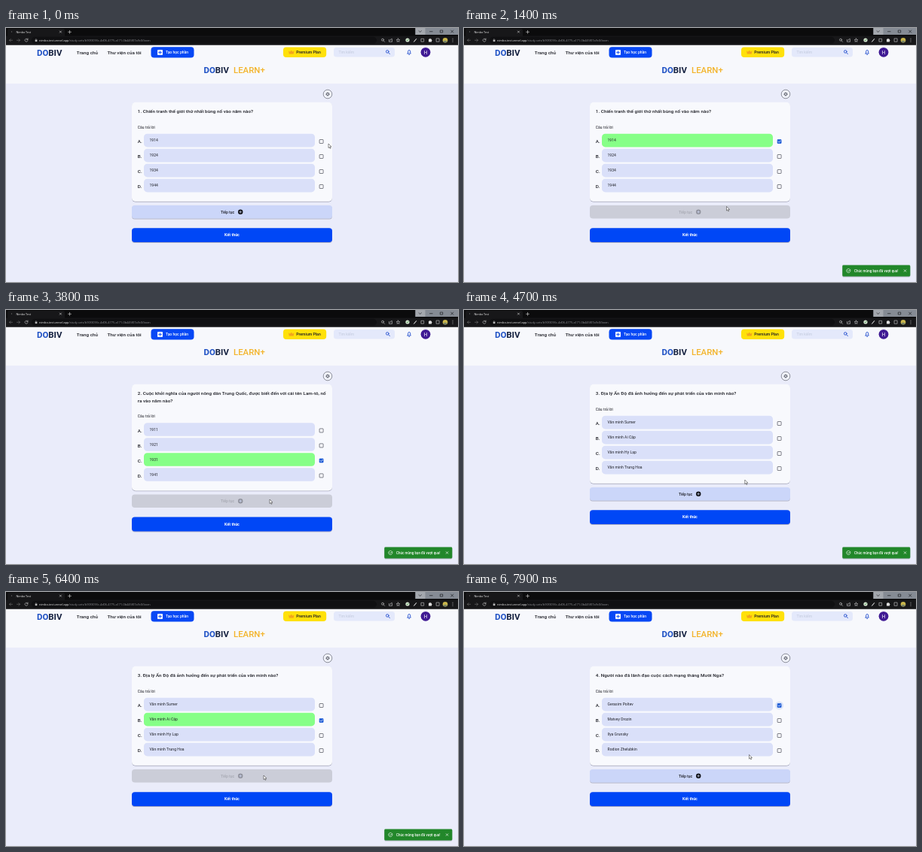
Recreate the animation shown at these times as an HTML page. Size 600x338 px, loop 8000 ms.

```html
<!DOCTYPE html>
<html lang="vi">
<head>
<meta charset="utf-8">
<title>Quiz</title>
<style>
  html, body { margin: 0; width: 100%; height: 100%; overflow: hidden; background: #eaecfa; }
  svg { display: block; width: 100vw; height: 100vh; }
  text { font-family: Roboto, Arial, sans-serif; font-size: 5px; fill: #1c1d24; white-space: pre; }
  .h6 { font-size: 6.25px; font-weight: 500; letter-spacing: .047px; }
  .body { letter-spacing: .047px; }
  .medium { font-weight: 500; }
  .brand { font-size: 11.4px; font-weight: 700; fill: #14203f; }
  .blue { fill: #1c4fc4; }
  .chrome { font-family: "Open Sans", "Noto Sans", sans-serif; font-size: 3.9px; fill: #f1f1f1; }
  .line { fill: none; stroke-linecap: round; stroke-linejoin: round; }
</style>
</head>
<body>
<svg viewBox="0 0 600 338" preserveAspectRatio="none">
  <defs>
    <filter id="shadow" x="-5%" y="-20%" width="110%" height="150%">
      <feDropShadow dx="0" dy=".8" stdDeviation=".6" flood-color="#20243c" flood-opacity=".38"/>
    </filter>
  </defs>
  <rect width="600" height="338" fill="#eaecfa"/>
  <rect y="22" width="600" height="52" fill="#f7f8fc"/>

  <g id="browser">
    <rect width="600" height="22.5" fill="#0b0b0c"/>
    <path d="M2 10.5V3q0-2 2-2h72q2 0 2 2v7.5h522v12H0v-12z" fill="#171719"/>
    <rect x="34" y="11.8" width="458" height="9" rx="4.5" fill="#101012"/>
    <text class="chrome" x="13.5" y="6.5" style="font-size:3.7px">Nimbo Test</text>
    <circle cx="7.5" cy="5" r=".7" fill="#666"/>
    <path class="line" stroke="#ddd" stroke-width=".6" d="M71.3 4l2.2 2.2m0-2.2l-2.2 2.2M82.5 5.3h4m-2-2v4"/>
    <path class="line" stroke="#777" stroke-width=".6" d="M8.5 16.3h-4m1.7-1.7l-1.7 1.7 1.7 1.7M14.5 16.3h4m-1.7-1.7l1.7 1.7-1.7 1.7"/>
    <path class="line" stroke="#ccc" stroke-width=".6" d="M28.8 15.2a2 2 0 1 0 .2 1.6m0-2.8v1.4h-1.5"/>
    <rect x="38.7" y="15.8" width="2.6" height="2.3" fill="#bbb"/>
    <path class="line" stroke="#bbb" stroke-width=".5" d="M39.2 16v-.8q.8-1.6 1.6 0v.8"/>
    <text class="chrome" x="44" y="17.7">nimbo-test.vercel.app<tspan fill="#8f9094">/study-sets/b90f3093c-4d06-4775-a171-0b445f07a9c0/learn</tspan></text>
    <rect x="543.5" width="56.5" height="9" fill="#858b94"/>
    <rect x="543.5" width="13" height="9" fill="#a4a8ae"/>
    <path class="line" stroke="#17181b" stroke-width=".65" d="M548 3.8l1.7 1.6 1.7-1.6M562.5 4.7h3.6M576.7 3h3v3h-3zM590.6 3l3.2 3.2m0-3.2l-3.2 3.2"/>
    <g class="line" stroke="#d0d0d2" stroke-width=".6">
      <circle cx="500" cy="15.7" r="1.5"/>
      <path d="M501.2 17l1.4 1.4M508.5 15.5v2.8h4v-2.8M510 16.5q0-2 2.4-2.2M520.5 14l.7 1.5 1.6.2-1.2 1.1.3 1.6-1.4-.8-1.4.8.3-1.6-1.2-1.1 1.6-.2z"/>
      <path d="M541.6 18.2l3-3.6" stroke="#fff" stroke-width="1"/>
      <path d="M551.3 14.3h3.4v3.8h-3.4zM571.5 14h3.6v4.2h-3.6z"/>
    </g>
    <circle cx="533" cy="16" r="2.6" fill="#dce9d6"/>
    <path class="line" stroke="#297a35" stroke-width=".8" d="M531.8 16l.9 1 1.7-2"/>
    <path d="M561 14.7h1.2q.8-1.8 1.6 0h1.2v1.2q1.6.7 0 1.4v1.2h-4z" fill="#ddd"/>
    <circle cx="583" cy="16.2" r="3.3" fill="#c9b64c"/>
    <path d="M580.2 17.8q2.8-2 5.6 0-2.8 3.4-5.6 0" fill="#74836a"/>
    <path class="line" stroke="#ddd" stroke-width=".9" d="M593 14.2v0M593 16.2v0M593 18.2v0"/>
  </g>

  <g id="navigation">
    <text class="brand" x="41" y="36.5"><tspan class="blue">DO</tspan>BIV</text>
    <text class="h6" x="93.8" y="34.5">Trang chủ</text>
    <text class="h6" x="134.4" y="34.5">Thư viện của tôi</text>
    <rect x="192.5" y="25.3" width="57" height="14.2" rx="4" fill="#0748f5"/>
    <rect x="201" y="29" width="7" height="7" rx=".9" fill="#fff"/>
    <path class="line" stroke="#0748f5" stroke-width=".9" d="M204.5 30.6v3.8m-1.9-1.9h3.8"/>
    <text class="medium" x="212" y="34.1" style="fill:#fff">Tạo học phần</text>
    <rect x="368" y="25.5" width="57.2" height="13.6" rx="4" fill="#ffe10a"/>
    <path d="M375 30.2l1.8 1.5 2-2 1.8 2 1.9-1.5-.8 4.2h-5.9z" fill="#f3a51c"/>
    <text class="medium" x="385.3" y="34.1" style="font-size:5.15px">Premium Plan</text>
    <rect x="435" y="26" width="81" height="12.6" rx="3.5" fill="#e4e9fb"/>
    <text x="441.5" y="34" style="fill:#c2c9dc">Tìm kiếm</text>
    <g class="line" stroke="#2450cf" stroke-width=".9">
      <circle cx="506.3" cy="31.4" r="1.8"/>
      <path d="M507.7 32.9l1.8 1.8M533 34h4.4l-.7-.9v-2q-.2-1.6-1.5-1.7-1.3.1-1.5 1.7v2zM534.8 35.4h.8"/>
    </g>
    <circle cx="557" cy="32.3" r="6.4" fill="#401b94"/>
    <text x="557" y="34.7" text-anchor="middle" style="fill:#fff;font-size:6.3px">H</text>
    <text class="brand" x="262.5" y="59.8"><tspan class="blue">DO</tspan>BIV</text>
    <text class="brand" x="302" y="59.8" style="fill:#f3b42c;font-weight:500">LEARN+</text>
  </g>

  <g fill="none" stroke="#50535d">
    <circle cx="427" cy="88" r="5.8" stroke-width=".6" fill="#f1f3fb"/>
    <circle cx="427" cy="88" r="1.5" stroke-width=".9"/>
    <circle cx="427" cy="88" r="2.3" stroke-width=".7" stroke-dasharray="1 .8"/>
  </g>

  <rect id="card" x="167" y="98.8" width="266" rx="5" fill="#f8f9fd" filter="url(#shadow)"/>
  <g id="question"></g>
  <g id="lower">
    <g id="answers"></g>
    <rect id="next" x="167" y="236" width="266" height="17.5" rx="4"/>
    <text id="nextLabel" class="medium" x="285" y="246.5">Tiếp tục</text>
    <circle id="nextDot" cx="311.2" cy="244.8" r="3.2"/>
    <path class="line" stroke="#d5ddf8" stroke-width=".7" d="M311.2 243.3v3m-1.5-1.5h3"/>
    <rect x="167" y="266.2" width="266" height="18.8" rx="4" fill="#0546f6" filter="url(#shadow)"/>
    <text x="300" y="277.3" text-anchor="middle" style="fill:#fff;font-size:5.3px;font-weight:700">Kết thúc</text>
  </g>

  <g id="toast">
    <rect x="502.3" y="315.5" width="90" height="15" rx="1.4" fill="#238729" filter="url(#shadow)"/>
    <g class="line" stroke="#fff" stroke-width=".65">
      <path d="M512.9 322.4a2.6 2.6 0 1 1-1.5-1.8M509.2 322.8l1.1 1.1 2.6-2.7M584.2 321.7l2.6 2.6m0-2.6l-2.6 2.6"/>
    </g>
    <text class="medium body" x="518" y="324.5" style="fill:#fff;font-size:4.45px">Chúc mừng bạn đã vượt qua!</text>
  </g>

  <path id="arrow" d="M0 0v5.6l1.3-1.2.9 2 .9-.4-.9-2h1.8z" fill="#fff" stroke="#222" stroke-width=".5"/>
  <path id="hand" d="M-.6.5q.6-1 1.2 0v2.2l2.4.5q.7.2.6 1l-.5 2.8h-3l-2.2-2.7q.3-.9 1.5 0z" fill="#fff" stroke="#222" stroke-width=".5"/>
</svg>
<script>
const LOOP = 8000, STEP = 100, WRAP_SHIFT = 9.4, ROW = 20;
const SLIDE = 200, TOAST_LIFE = 1150;
const byId = id => document.getElementById(id);

// Each question: when it appears, when its box is ticked, when it is submitted.
const questions = [
  { from: 0, tick: 400, submit: 800, correct: 0,
    lines: ["1. Chiến tranh thế giới thứ nhất bùng nổ vào năm nào?"],
    answers: ["1914", "1924", "1934", "1944"] },
  { from: 1600, tick: 3000, submit: 3600, correct: 2,
    lines: ["2. Cuộc khởi nghĩa của người nông dân Trung Quốc, được biết đến với cái tên Lam-tô, nổ", "ra vào năm nào?"],
    answers: ["1911", "1921", "1931", "1941"] },
  { from: 4400, tick: 5500, submit: 6200, correct: 1,
    lines: ["3. Địa lý Ấn Độ đã ảnh hưởng đến sự phát triển của văn minh nào?"],
    answers: ["Văn minh Sumer", "Văn minh Ai Cập", "Văn minh Hy Lạp", "Văn minh Trung Hoa"] },
  { from: 7000, tick: 7400, submit: Infinity, correct: 0,
    lines: ["4. Người nào đã lãnh đạo cuộc cách mạng tháng Mười Nga?"],
    answers: ["Gerasim Poltev", "Matvey Drozin", "Ilya Grunsky", "Rodion Zhelubkin"] }
];

// Pointer stops: time, x, y.
const stops = [
  [0, 428, 154], [350, 419, 150], [480, 419, 150], [800, 349, 240], [1400, 348.5, 237.5],
  [1750, 349, 237], [2600, 396.5, 174], [2900, 418, 199], [3150, 418, 199], [3550, 350, 252],
  [4400, 350, 252], [5200, 422, 170], [5400, 423, 168], [5650, 421, 169], [6100, 342, 244],
  [6700, 342, 244], [7300, 419, 150], [7520, 419, 150], [7900, 378.5, 216.5], [8000, 366, 234]
];

const boxY = i => 151 + i * ROW;
byId("answers").innerHTML = `<text class="body" x="174.8" y="133.6">Câu trả lời</text>` +
  [..."ABCD"].map((letter, i) => `
    <text class="h6" x="174.8" y="${boxY(i) + 2.3}">${letter}.</text>
    <rect class="bar" x="183" y="${boxY(i) - 10.2}" width="227" height="17.6" rx="4.5"/>
    <text class="body answer" x="190.5" y="${boxY(i) + .3}"></text>
    <circle class="halo" cx="418.6" cy="${boxY(i)}" r="5.6" fill="#1f5fe0" opacity=".12"/>
    <rect class="box" x="416.1" y="${boxY(i) - 2.5}" width="5" height="5" rx=".5" stroke-width=".7"/>
    <path class="line tick" d="M417.2 ${boxY(i)}l1.1 1.2 2.1-2.3" stroke="#fff" stroke-width=".75"/>`).join("");

const all = name => [...document.querySelectorAll("." + name)];
const bars = all("bar"), answerTexts = all("answer"), halos = all("halo"), boxes = all("box"), ticks = all("tick");
const show = (node, on) => node.setAttribute("display", on ? "inline" : "none");
const clamp = v => Math.min(1, Math.max(0, v));
const smooth = v => v * v * (3 - 2 * v);

function pointerAt(t) {
  const i = Math.max(1, stops.findIndex(s => s[0] >= t));
  const [t0, x0, y0] = stops[i - 1], [t1, x1, y1] = stops[i];
  const k = smooth((t - t0) / (t1 - t0));
  return [x0 + (x1 - x0) * k, y0 + (y1 - y0) * k];
}

function toastVisibility(t) {
  return Math.max(...questions.map(({ submit }) => {
    const age = t - submit;
    const enter = 1 - (1 - clamp(age / SLIDE)) ** 2;
    return enter * (1 - clamp((age - TOAST_LIFE) / SLIDE) ** 2);
  }));
}

let shown;
function setQuestion(q, shift) {
  shown = q;
  byId("question").innerHTML = q.lines.map((line, i) =>
    `<text class="h6" x="174.8" y="${113.2 + i * WRAP_SHIFT}">${line}</text>`).join("");
  q.answers.forEach((answer, i) => answerTexts[i].textContent = answer);
  byId("card").setAttribute("height", 132 + shift);
  byId("lower").setAttribute("transform", `translate(0 ${shift})`);
}

function render(t) {
  const q = questions.findLast(item => t >= item.from);
  const shift = (q.lines.length - 1) * WRAP_SHIFT;
  if (q !== shown) setQuestion(q, shift);

  const ticked = t >= q.tick, done = t >= q.submit;
  const [x, y] = pointerAt(t);
  let clickable = !done && x > 167 && x < 433 && y > 236 + shift && y < 253.5 + shift;

  boxes.forEach((box, i) => {
    const on = ticked && i === q.correct;
    const hover = Math.hypot(x - 418.6, y - boxY(i) - shift) < 6.5;
    clickable ||= hover;
    bars[i].setAttribute("fill", done && i === q.correct ? "#86ff87" : "#dae0f9");
    box.setAttribute("fill", on ? "#1d5bd6" : "none");
    box.setAttribute("stroke", on ? "#1d5bd6" : "#4b4e58");
    show(ticks[i], on);
    show(halos[i], hover || on && t - q.tick <= 500);
  });

  byId("next").setAttribute("fill", done ? "#cbcdd8" : "#cbd6f9");
  byId("next").setAttribute("filter", done ? "none" : "url(#shadow)");
  byId("nextLabel").style.fill = done ? "#a6a8b2" : "#1c1d24";
  byId("nextDot").setAttribute("fill", done ? "#90929d" : "#0c0d12");

  const visible = toastVisibility(t);
  show(byId("toast"), visible > 0);
  byId("toast").setAttribute("transform", `translate(${(1 - visible) * 100} 0)`);

  for (const id of ["arrow", "hand"]) {
    byId(id).setAttribute("transform", `translate(${x} ${y})`);
    show(byId(id), (id === "hand") === clickable);
  }
}

const start = performance.now();
function frame() {
  const t = (performance.now() - start) % LOOP;
  render(Math.floor(t / STEP) * STEP);
  requestAnimationFrame(frame);
}
frame();
</script>
</body>
</html>
```
